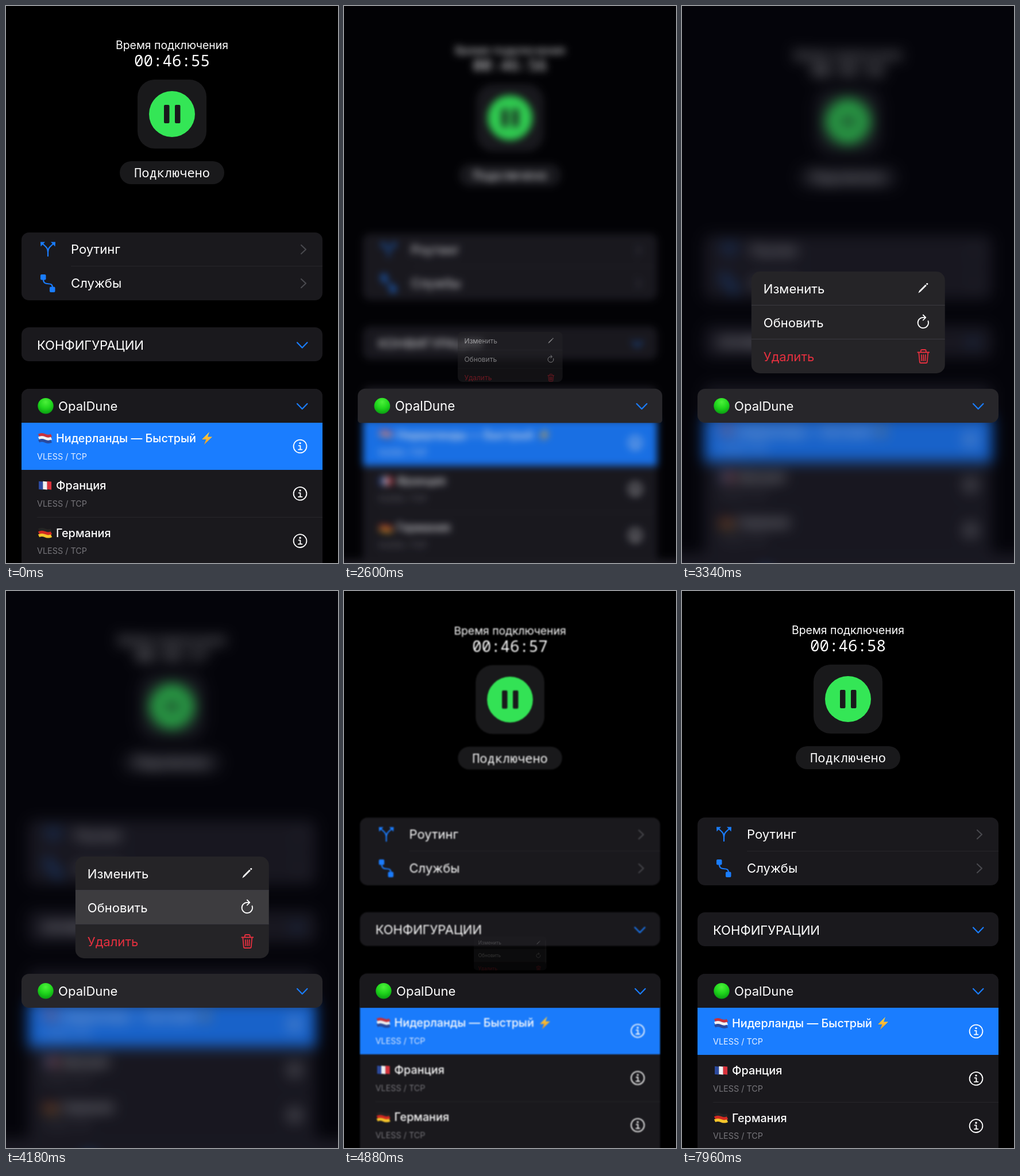
Write an HTML page that moves like this. It is 578 by 969 pixels and loops after 8 s.

```html
<!DOCTYPE html>
<html lang="ru">
<head>
<meta charset="utf-8">
<style>
html, body { margin: 0; width: 100%; height: 100%; overflow: hidden; background: #000; }
#stage { position: absolute; left: 0; top: 0; width: 578px; height: 969px; overflow: hidden; background: #000; }
svg { position: absolute; left: 0; top: 0; overflow: visible; display: block; }
#page { transform-origin: 289px 484.5px; }
#tint { position: absolute; inset: 0; background: rgb(16,16,40); opacity: 0; }
#chip { position: absolute; left: 27px; top: 666px; width: 524px; height: 59px; }
#menu { position: absolute; left: 0; top: 0; width: 337px; height: 177px; overflow: hidden;
  border-radius: 15px; background: #252427; transform-origin: 0 0; }
text { font-family: Inter, Roboto, sans-serif; fill: #fff; white-space: pre; }
.mono { font-family: "Noto Sans Mono", "DejaVu Sans Mono", monospace; text-anchor: middle; }
.row { font-size: 22.1px; }
.place { font-size: 19.85px; font-weight: 500; }
.sub { font-size: 14.4px; fill: #77767b; }
.card { fill: #1a191d; }
.line { stroke: #27262a; }
.stroke { fill: none; stroke-linecap: round; stroke-linejoin: round; stroke-width: 2.2; }
.thin { stroke-width: 1.8; }
.blue { stroke: #1a7dff; }
.grey { stroke: #48484d; }
.white { stroke: #fff; }
.red { stroke: #e5303f; }
</style>
</head>
<body>
<div id="stage">
  <svg id="page" width="578" height="1040">
    <defs>
      <radialGradient id="ball" cx=".5" cy=".25" r=".75">
        <stop offset="0" stop-color="#4cf03a"/><stop offset=".55" stop-color="#1fd51c"/><stop offset="1" stop-color="#0a9d12"/>
      </radialGradient>
      <linearGradient id="spark" x1="0" y1="0" x2="0" y2="1">
        <stop offset="0" stop-color="#ffd84a"/><stop offset="1" stop-color="#f79a1c"/>
      </linearGradient>
      <path id="down" class="stroke blue" d="M-8.7 -4.5L0 4.5L8.7 -4.5"/>
      <path id="next" class="stroke grey" d="M-4 -7.5L4 0L-4 7.5"/>
      <g id="info">
        <circle r="11.4" class="stroke thin white"/>
        <circle cy="-5.4" r="1.7" fill="#fff"/>
        <path class="stroke thin white" d="M-2.4 -1.2H.4V5.6M-3 5.6H3.4"/>
      </g>
    </defs>

    <text x="289" y="74.5" font-size="19.4" text-anchor="middle">Время подключения</text>
    <text id="clock" class="mono" x="289" y="105" font-size="27.5"></text>
    <g fill="#19191b">
      <rect x="229" y="128" width="120" height="120" rx="30"/>
      <rect x="198" y="270" width="182" height="40" rx="20"/>
      <circle cx="289" cy="188" r="40" fill="#34e656"/>
      <rect x="275" y="172" width="9.5" height="32" rx="2"/>
      <rect x="294" y="172" width="9.5" height="32" rx="2"/>
    </g>
    <text class="mono" x="289" y="298" font-size="22">Подключено</text>

    <rect class="card" x="27" y="394" width="524" height="118" rx="13"/>
    <path class="line" d="M113 452.5H551"/>
    <path class="stroke blue" d="M73 435V428C73 420 68 418 63 413M73 428C73 420 78 418 83 413"/>
    <path fill="#1a7dff" d="M60 410.5H68L60.5 418.5ZM86 410.5H78L85.5 418.5Z"/>
    <text class="row" x="113" y="430.5">Роутинг</text>
    <use href="#next" x="518" y="423.5"/>
    <path class="stroke blue" d="M65 475C65 490 81 477 81 490"/>
    <g fill="#1a7dff"><rect x="60" y="467" width="9.5" height="9.5" rx="2"/><rect x="76" y="488.5" width="9.5" height="9.5" rx="2"/></g>
    <text class="row" x="113" y="490">Службы</text>
    <use href="#next" x="518" y="482.5"/>

    <rect class="card" x="27" y="559" width="524" height="59" rx="13"/>
    <text class="row" x="54" y="597.5">КОНФИГУРАЦИИ</text>
    <use href="#down" x="515.7" y="590"/>

    <rect class="card" x="27" y="666" width="524" height="390" rx="13"/>
    <rect x="27" y="725" width="524" height="82" fill="#1a7dff"/>
    <path class="line" d="M54 889.5H551"/>
    <g id="rows"></g>
    <path fill="url(#spark)" d="M354 741L341 754H348.5L345 763L359 749.5H351Z"/>
    <rect x="-40" y="973" width="660" height="67" fill="#1c1b1f"/>
    <circle cx="139" cy="1012" r="10" fill="#1a7dff"/>
  </svg>
  <div id="tint"></div>

  <div id="menu">
    <svg width="337" height="177">
      <rect id="press" y="59" width="337" height="59" fill="#fff" opacity="0"/>
      <path stroke="#3b3a40" d="M0 58.5H337M0 117.5H337"/>
      <text class="row" x="21" y="37.5">Изменить</text>
      <text class="row" x="21" y="96.5">Обновить</text>
      <text class="row" x="21" y="156" style="fill:#e5303f">Удалить</text>
      <path fill="#fff" d="M290.5 37.5L292.5 33L303 22.5L305 24.5L294.5 35ZM304 21.5L305.5 20Q308 20 307.5 22L306 23.5Z"/>
      <path class="stroke thin white" d="M307.7 86A9.2 9.2 0 1 1 299 79.8H302M299 75.5L303.5 79.8L299 84.5"/>
      <path class="stroke thin red" d="M289.5 140.5H309.5M295 140V138Q295 136 297 136H302Q304 136 304 138V140M291.5 141L293 157Q293 159 295 159H304Q306 159 306 157L307.5 141M296 145L296.5 155M299.5 145V155M303 145L302.5 155"/>
      <rect id="bar" x="329.5" y="18" width="4" height="107" rx="2" fill="#fff" opacity="0"/>
    </svg>
  </div>

  <div id="chip">
    <svg width="524" height="59">
      <circle cx="42" cy="29.7" r="13.7" fill="url(#ball)"/>
      <text class="row" x="64" y="37.7">OpalDune</text>
      <use href="#down" x="488.7" y="30.5"/>
    </svg>
  </div>
</div>

<script>
const $ = id => document.getElementById(id);
const LOOP = 8000, SECOND = 2300;
const OPEN = 2480, CLOSE = 4260;

const across = colors => colors.map((color, i) =>
  `<path d="M57 ${5 * i - 5}q5.5 -2.6 11 0t11 0" fill="none" stroke="${color}" stroke-width="5.2"/>`).join("");
const upright = colors => colors.map((color, i) =>
  `<path d="M${57 + 7.3 * i} -7.5l7.5 .8v14l-7.5 -.8z" fill="${color}"/>`).join("");

const places = [
  ["Нидерланды — Быстрый", across(["#c8323c", "#f2f2f2", "#2a4a9c"])],
  ["Франция", upright(["#2c4a9e", "#f2f2f2", "#d8323c"])],
  ["Германия", across(["#242424", "#d22a22", "#f6c52c"])]
];
$("rows").innerHTML = places.map(([name, flag], i) => `
  <g transform="translate(0 ${752 + i * 82.3})">${flag}
    <text class="place" x="87" y="7">${name}</text>
    <text class="sub" x="54" y="36.5" ${i ? "" : 'style="fill:#e6efff"'}>VLESS / TCP</text>
    <use href="#info" x="512" y="14"/>
  </g>`).join("");

const part = (t, from, to) => Math.min(1, Math.max(0, (t - from) / (to - from)));
const smooth = (t, from, to) => { const x = part(t, from, to); return x * x * (3 - 2 * x); };
const settle = (t, from, to) => 1 - (1 - part(t, from, to)) ** 3;

function drawPage(t) {
  const depth = smooth(t, 1840, 3340) - smooth(t, CLOSE, 5000);
  $("clock").textContent = "00:46:" + (55 + Math.floor((t + 1100) / SECOND));
  $("page").style.transform = `scale(${1 - .043 * depth})`;
  $("page").style.filter = depth ? `blur(${13 * depth}px)` : "none";
  $("tint").style.opacity = .25 * depth;
}

function drawChip(t, opened) {
  const swell = smooth(t, 1560, OPEN) - smooth(t, 2560, 3100);
  const shade = 13 * (smooth(t, 1640, OPEN) - smooth(t, CLOSE, 4540));
  const corner = 13 * opened;
  const chip = $("chip").style;
  chip.transform = `scale(${1 + .012 * swell})`;
  chip.background = `rgb(${26 + shade},${25 + shade},${29 + shade})`;
  chip.borderRadius = `13px 13px ${corner}px ${corner}px`;
}

function drawMenu(t, opened) {
  const size = .25 + .75 * opened, shrunk = 1 - size;
  const height = 177 - 34 * shrunk;
  const top = 639 + 33 * shrunk - height * size;
  const menu = $("menu").style;
  menu.height = height + "px";
  menu.opacity = Math.min(1, 1.2 * opened);
  menu.transform = `translate(${289.3 - 168.5 * size}px, ${top}px) scale(${size})`;
  $("press").setAttribute("opacity", .11 * smooth(t, 4040, 4080));
  $("bar").setAttribute("opacity", .13 * smooth(t, CLOSE, 4400));
}

const start = performance.now();
function tick() {
  const t = (performance.now() - start) % LOOP;
  const opened = settle(t, OPEN, 3280) - smooth(t, CLOSE, 5100);
  drawPage(t);
  drawChip(t, opened);
  drawMenu(t, opened);
  requestAnimationFrame(tick);
}
tick();
</script>
</body>
</html>
```
